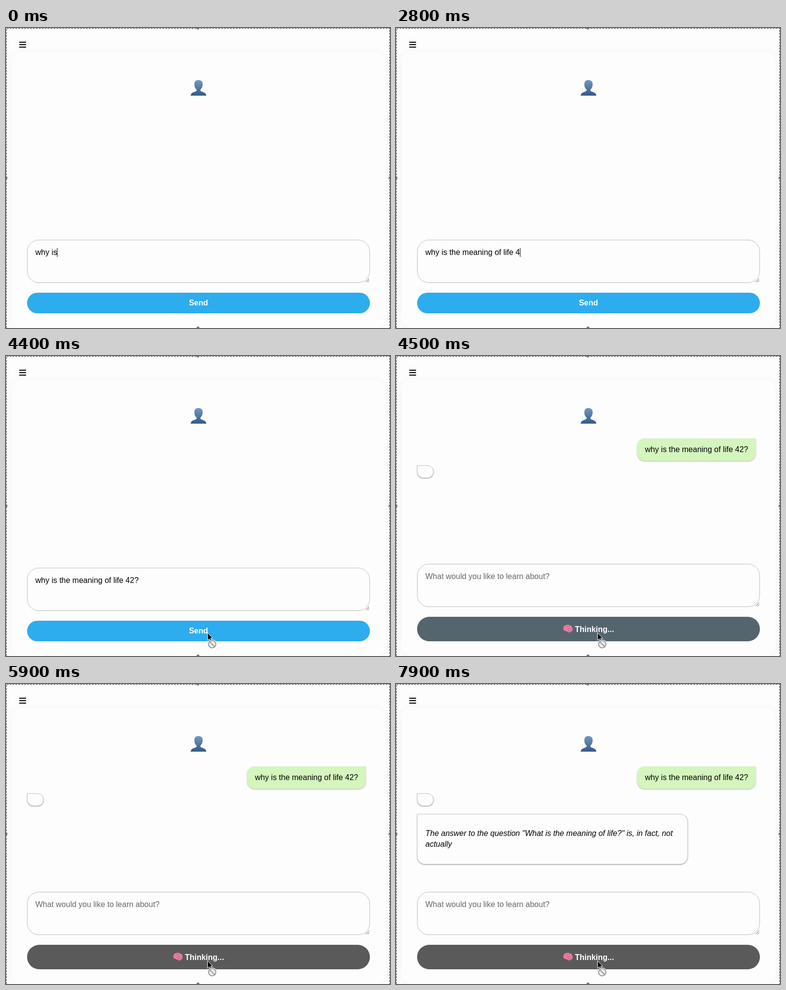
These frames come from a looping animation (784 by 612 pixels, 8 s). An HTML page:

```html
<!DOCTYPE html>
<html lang="en">
<head>
<meta charset="utf-8">
<title>Chat</title>
<style>
  html, body { margin: 0; width: 100%; height: 100%; overflow: hidden; background: #fdfdfd; }
  body { position: relative; font: 16px/22.4px "Liberation Sans", Arial, sans-serif; color: #000; }
  body > * { position: absolute; box-sizing: border-box; }
  svg { left: 0; top: 0; }
  #panel { left: 11px; top: 49px; width: 764px; height: 563px; border-radius: 20px; box-shadow: 0 0 16px rgba(0,0,0,.045); }
  #input { left: 43px; top: 432px; width: 700px; height: 88px; padding: 14px 16px; border: 1px solid #bcbcbc; border-radius: 24px; white-space: pre; }
  #caret { display: inline-block; width: 1px; height: 18px; margin-right: -1px; background: #000; vertical-align: -4px; }
  #grip { left: 733px; top: 510px; }
  #button { left: 43px; top: 540px; width: 700px; height: 42px; border-radius: 25px; color: #fff; font-weight: bold; display: flex; align-items: center; justify-content: center; }
  #brain { width: 20px; height: 20px; margin-right: 4.4px; }
  .bubble { max-width: 553px; padding: 12px 16px; border-radius: 16px; box-shadow: 0 1px 2px rgba(0,0,0,.3); }
  .reply { left: 43px; border: 1px solid #c4c4c4; border-top-left-radius: 0; background: #fdfdfd; }
  .reply p { margin: 16px 0; font-style: italic; }
  #question { right: 49px; top: 168px; border-top-right-radius: 0; background: #d4f5bd; white-space: pre; }
  [hidden] { display: none !important; }
</style>
</head>
<body>
<div id="panel"></div>
<svg width="784" height="612">
  <defs>
    <linearGradient id="blue" gradientUnits="userSpaceOnUse" x1="0" y1="106" x2="0" y2="138">
      <stop stop-color="#7299c3"/><stop offset="1" stop-color="#365a86"/>
    </linearGradient>
  </defs>
  <path d="M27 29H41M27 34H41M27 39H41" stroke="#000" stroke-width="2"/>
  <path fill="url(#blue)" d="M393 106C398.500 106 401.500 109.500 401.500 115C401.500 120 399.500 123.500 397 125.500V128C399 131 408.500 130 409 138H377C377.500 130 387 131 389 128V125.500C386.500 123.500 384.500 120 384.500 115C384.500 109.500 387.500 106 393 106Z"/>
  <path d="M.5 612V.5H783.500V612" fill="none" stroke="#222" stroke-dasharray="4 2"/>
  <g fill="#777"><circle cx="392" cy="0" r="3"/><circle cx="392" cy="612" r="3"/><circle cx="0" cy="306" r="3"/><circle cx="784" cy="306" r="3"/></g>
</svg>

<div id="question" class="bubble" hidden>why is the meaning of life 42?</div>
<div id="empty" class="bubble reply" style="top:223px" hidden></div>
<div id="answer" class="bubble reply" style="top:265px" hidden><p></p></div>

<div id="input"><span id="typed"></span><i id="caret"></i></div>
<svg id="grip" width="9" height="9"><path d="M1 8.500L8.500 1M5 8.500L8.500 5" stroke="#555"/></svg>
<div id="button">
  <svg id="brain" viewBox="0 0 20 20" style="position:static">
    <path fill="#ee83a4" d="M1 11C-.5 5 4 1.500 9 1.500C15 1 20 5 19.500 11C19.500 14 17 15.500 14.500 15.500L13 18.500L10.500 15C7 16 5.500 14.500 5 13C3 14 1.500 13 1 11Z"/>
    <path fill="none" stroke="#b94670" stroke-width="1" d="M3 9C5 9 4 6 7 6M7 3C9 4 8 6 10 6S12 3 14 4M5 12C8 12 7 9 10 10S13 7 16 8M10 14C12 14 12 12 15 12S17 10 18 11"/>
  </svg>
  <span id="label"></span>
</div>

<svg id="pointer" width="784" height="612">
  <g id="hand" fill="#fff" stroke="#000" stroke-linejoin="round">
    <path d="M5 17L1 10Q0 8 2 8L4 10V2Q5.500 0 7 2V7Q9 5 10 7Q12 6 13 8Q15 7 15 9V13L13 17Z"/>
  </g>
  <g id="blocked">
    <path d="M411.500 564.500V580L415 576.800L417.500 582L420 581L417.700 575.800H422Z" stroke="#fff"/>
    <circle cx="421" cy="588" r="9.500" fill="#fff"/>
    <circle cx="421" cy="588" r="7.500" fill="#ededed" stroke="#999" stroke-width="2"/>
    <path d="M416 583L426 593" stroke="#999" stroke-width="2"/>
  </g>
</svg>

<script>
const $ = id => document.getElementById(id);
const question = $('question').textContent;
const tokens = 'The| answer| to| the| question| "|What| is| the| meaning| of| life|?"| is|,| in| fact|,| not| actually'.split('|');
const LOOP = 8000, STEP = 100, CLICK = 4400;

// [time, characters typed] and [time, tokens received]
const typing = [[0, 6], [1100, 14], [2100, 26], [2200, 26], [2300, 27], [2600, 27], [2700, 28], [2900, 28], [3000, 29], [3200, 30]];
const streaming = [[6600, 0], [7000, 5], [7400, 13], [7500, 13], [7900, 20]];

function keyed(keys, t) {
  const next = keys.findIndex(key => key[0] > t);
  if (next < 0) return keys[keys.length - 1][1];
  if (next === 0) return keys[0][1];
  const [t0, a] = keys[next - 1], [t1, b] = keys[next];
  return a + (b - a) * (t - t0) / (t1 - t0);
}

function draw(t) {
  const sent = t > CLICK;
  const count = Math.floor(keyed(streaming, t) + 1e-6);
  const top = sent ? -8 : 0;

  $('input').style.top = 432 + top + 'px';
  $('grip').style.top = 510 + top + 'px';
  $('typed').textContent = sent ? 'What would you like to learn about?' : question.slice(0, Math.floor(keyed(typing, t) + 1e-6));
  $('typed').style.color = sent ? '#666' : '#000';
  $('caret').hidden = t >= CLICK || (t > 3200 && (t - 3200) % 1000 >= 500);

  const fade = sent ? 1 - Math.exp((CLICK - t) / 50) : 0;
  const color = [45, 172, 238].map(c => Math.round(c + (90 - c) * fade));
  Object.assign($('button').style, { top: 540 + top + 'px', height: 42 - top + 'px', background: `rgb(${color})` });
  $('label').textContent = sent ? 'Thinking...' : 'Send';
  $('label').style.transform = sent ? 'translateY(1px)' : '';
  $('brain').style.display = sent ? '' : 'none';

  $('question').hidden = $('empty').hidden = !sent;
  $('answer').hidden = !count;
  $('answer').firstChild.textContent = tokens.slice(0, count).join('');

  const away = Math.max(0, 1 - (t - 3900) / 300) ** 2;
  $('hand').style.display = t >= 3900 && t < CLICK ? '' : 'none';
  $('hand').setAttribute('transform', `translate(${406 + 30 * away} ${565 - 20 * away})`);
  $('blocked').style.display = t >= CLICK ? '' : 'none';
}

function tick() {
  draw(Math.floor(performance.now() % LOOP / STEP) * STEP);
  requestAnimationFrame(tick);
}
tick();
</script>
</body>
</html>
```
